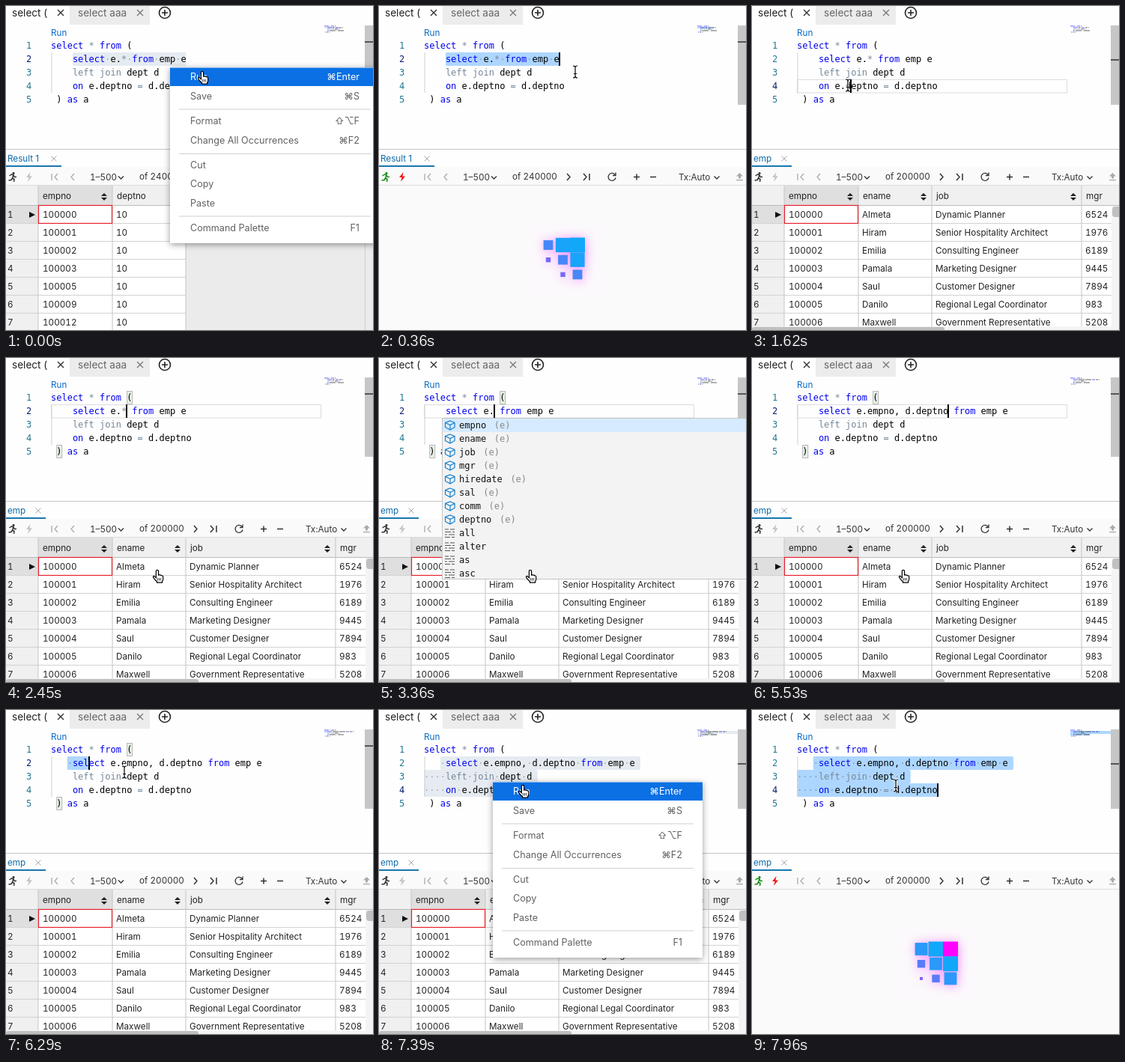
These frames come from a looping animation (490x433 px, 7.99 s). An HTML page:

```html
<!DOCTYPE html>
<html lang="en">
<head>
<meta charset="utf-8">
<title>SQL editor</title>
<style>
html, body { margin: 0; width: 100%; height: 100%; overflow: hidden; background: #fff; }
svg { display: block; width: 490px; height: 433px; }
text { font: 11.7px Inter, "DejaVu Sans", sans-serif; fill: #222; }
.code { font: 12px "DejaVu Sans Mono", monospace; }
.tab { font-size: 13.6px; }
.item { font-size: 12.6px; }
.num { font-variant-numeric: tabular-nums; }
.line { fill: none; stroke-width: 1.3; }
#menu { filter: drop-shadow(0 2px 4px #0006); }
</style>
</head>
<body>
<svg viewBox="0 0 490 433" xmlns="http://www.w3.org/2000/svg">
  <defs>
    <filter id="glow" x="-50%" y="-50%" width="200%" height="200%"><feGaussianBlur stdDeviation="7"/></filter>
  </defs>
  <rect width="490" height="433" fill="#fefefe"/>
  <g id="tabs"></g>
  <g id="editor"></g>
  <g id="result"></g>
  <g id="popup"></g>
  <g id="menu"></g>
  <g id="mouse"></g>
</svg>
<script>
const LOOP = 7990, CW = 7.224, LEFT = 60, TOP = 44, LH = 18;
const colX = c => LEFT + c * CW;
const lineY = l => TOP + l * LH;

const rect = (x, y, w, h, fill, more = '') =>
  `<rect x="${x}" y="${y}" width="${w}" height="${h}" fill="${fill}" ${more}/>`;
const text = (x, y, s, fill = '#222', cls = '', more = '') =>
  `<text x="${x}" y="${y}" style="fill:${fill}" class="${cls}" ${more}>${s}</text>`;
const line = (d, stroke, w = 1.3) =>
  `<path class="line" d="${d}" stroke="${stroke}" style="stroke-width:${w}"/>`;
const shape = (d, fill) => `<path d="${d}" fill="${fill}"/>`;
const cross = (x, y, r, c, w) =>
  line(`M${x - r} ${y - r}l${2 * r} ${2 * r}m0 ${-2 * r}l${-2 * r} ${2 * r}`, c, w);

// Last entry of [time, value] pairs that has begun
const at = (list, t) => list.reduce((v, e) => t >= e[0] ? e[1] : v, list[0][1]);

const cache = {};
function put(id, html) {
  if (cache[id] === html) return;
  cache[id] = html;
  document.getElementById(id).innerHTML = html;
}

/* ---------- timeline ---------- */
const FIELDS = [
  [0, 'e.*'], [2670, 'e.'], [2950, 'e'], [3190, 'e.'], [3830, 'e.empno'], [4160, 'e.empno,'],
  [4310, 'e.empno, '], [4370, 'e.empno, d'], [4430, 'e.empno, d.'], [4990, 'e.empno, d.deptno']
];
// Selection as [line, col, line, col]
const SELECTION = [
  [0, [1, 4, 1, 25]], [1590, null], [6230, [1, 3, 1, 4]], [6260, [1, 3, 1, 5]], [6290, [1, 3, 1, 7]],
  [6320, [1, 3, 1, 14]], [6350, [1, 3, 2, 13]], [6410, [1, 3, 2, 18]], [6440, [1, 3, 3, 19]],
  [6500, [1, 3, 3, 23]], [6560, [1, 3, 3, 26]]
];
const POPUP = [[0, ''], [3270, 'e'], [3830, ''], [4490, 'd'], [4990, '']];
const MENU = [[0, [219, 82]], [120, null], [7110, [152, 96]], [7690, null]];
const PATH = [
  [0, 262, 88], [1080, 262, 88], [1560, 128, 106], [1800, 128, 106], [2120, 163, 72], [2210, 163, 72],
  [2450, 202, 284], [5530, 202, 284], [6100, 84, 71], [6220, 84, 71], [6290, 158, 83], [6560, 250, 107],
  [6880, 250, 107], [7080, 153, 95], [7140, 153, 95], [7390, 192, 101], [LOOP, 192, 101]
];

function mouseAt(t) {
  const i = PATH.findIndex(p => p[0] > t), [t0, x0, y0] = PATH[i - 1], [t1, x1, y1] = PATH[i];
  let k = (t - t0) / (t1 - t0);
  k = k * k * (3 - 2 * k);
  return [+(x0 + (x1 - x0) * k).toFixed(1), +(y0 + (y1 - y0) * k).toFixed(1)];
}

/* ---------- tabs ---------- */
put('tabs',
  rect(85, 0, 107, 25, '#ececec') +
  text(8, 14, 'select (', '#222', 'tab') + cross(73, 9, 4, '#333', 1.4) +
  text(96, 14, 'select aaa', '#666', 'tab') + cross(179, 9, 4, '#777', 1.3) +
  `<circle class="line" cx="212" cy="9" r="7.5" stroke="#222" style="stroke-width:1.6"/>` +
  line('M208 9h8m-4-4v8', '#222', 1.6));

/* ---------- editor ---------- */
const KEYWORD = /^(select|from|on|as)$/, OPERATOR = /^(left|join|\*|=)$/;
const tokenColor = s => KEYWORD.test(s) ? '#0000f0' : OPERATOR.test(s) ? '#778899' : '#000';

function caretAt(t, sel, fields) {
  if (sel) return [sel[2], sel[3]];
  return t < 2150 ? [3, 10] : [1, 11 + fields.length];
}

function selectionSpans(sel, lines) {
  if (!sel) return [];
  const [l0, c0, l1, c1] = sel, spans = [];
  for (let l = l0; l <= l1; l++)
    spans.push([l, l === l0 ? c0 : 0, l === l1 ? c1 : lines[l].length + 1]);
  return spans;
}

function editor(t) {
  const fields = at(FIELDS, t), sel = at(SELECTION, t), focus = !at(MENU, t);
  const lines = ['select * from (', `    select ${fields} from emp e`, '    left join dept d',
    '    on e.deptno = d.deptno', ' ) as a'];
  const [cl, cc] = caretAt(t, sel, fields);
  const selColor = focus ? '#add6ff' : '#e5ebf1';
  let s = text(60, 40, 'Run', '#0a6ac8', '', 'font-size="12"');
  if (!sel) s += rect(60.5, lineY(cl) + .5, 360, 17.5, 'none', 'stroke="#dcdcdc"');

  const spans = selectionSpans(sel, lines);
  for (const [l, a, b] of spans) {
    s += rect(colX(a), lineY(l), (b - a) * CW, LH, selColor, 'rx="2"');
    s += rect(425, 28 + (l - 1) * 2, l === cl ? b - a : 54, 2, selColor);
    for (let c = a; c < Math.min(b, lines[l].length); c++)
      if (lines[l][c] === ' ') s += text(colX(c), lineY(l) + 13, '·', '#33333355', 'code');
  }
  s += rect(60.5, 62, 1, 54, '#d0d0d0');
  if (t >= 1680 && t < 6380)
    for (const [l, c] of [[0, 14], [4, 1]])
      s += rect(colX(c) + .5, lineY(l) + .5, 7, 17, '#e6f0e6', 'stroke="#b9b9b9"');

  lines.forEach((str, l) => {
    s += text(27, lineY(l) + 13, l + 1, l === cl ? '#0b216f' : '#237893', 'code');
    for (const m of str.matchAll(/[a-z]+|[^\sa-z]/g)) {
      const color = tokenColor(m[0]);
      s += text(colX(m.index), lineY(l) + 13, m[0], color, 'code');
      s += rect(425 + m.index, 26.3 + l * 2, m[0].length, 1.2, color, 'opacity=".5"');
    }
  });

  const blinkOff = t >= 3680 && t < 3830;
  if (focus && !blinkOff) s += rect(Math.round(colX(cc)) - 1, lineY(cl), 2, LH, '#000');
  s += rect(479, 26, 11, 106, '#c6c6c6') + rect(479, cl === 3 ? 71 : 47, 11, 2, '#555');
  put('editor', s);
}

/* ---------- result panel ---------- */
const SMALL = {
  total: 'of 240000', tab: 'Result 1', tabW: 74, edges: [43, 142, 240], heads: ['empno', 'deptno'],
  rows: [0, 1, 2, 3, 5, 9, 12].map(n => [100000 + n, 10])
};
const BIG = {
  total: 'of 200000', tab: 'emp', tabW: 53, edges: [43, 142, 240, 440, 540], heads: ['empno', 'ename', 'job', 'mgr'],
  rows: [
    ['Almeta', 'Dynamic Planner', 6524], ['Hiram', 'Senior Hospitality Architect', 1976],
    ['Emilia', 'Consulting Engineer', 6189], ['Pamala', 'Marketing Designer', 9445],
    ['Saul', 'Customer Designer', 7894], ['Danilo', 'Regional Legal Coordinator', 983],
    ['Maxwell', 'Government Representative', 5208]
  ].map((r, i) => [100000 + i, ...r])
};

function toolbar(d, busy) {
  const dark = '#333', pale = '#aaa', run = busy ? '#128a12' : dark;
  return rect(0, 191, 490, 1, '#c4c4c4') +
    text(2, 208, d.tab, '#0a6aa6', '', 'font-size="12"') + cross(d.tabW - 10, 204, 3.5, '#aaa', 1) +
    rect(0, 213, d.tabW, 2, '#1a76b0') +
    rect(0, 215, 490, 25, '#fafafa') +
    `<circle cx="10" cy="223.5" r="1.6" fill="${run}"/>` +
    line('M4.5 227l3-2 2.5 1-1.5 4 2.5 1.5-.5 3.5M8.5 230l-1.5 2.5-3.5 .5M10 226.5l1.5 2h2.5', run, 1.5) +
    shape('M32.5 222l-5.500 7h3.500l-1.500 6 6-7.500h-3.500z', busy ? '#f01818' : '#c4c4c4') +
    line('M61 224v9M69 224l-4 4.500 4 4.500M91 224l-4 4.500 4 4.500', pale) +
    text(112, 233, '1–500', dark, 'num') + line('M150 227.500l3.500 3.500 3.500-3.500', dark) +
    text(178, 232, d.total, dark, 'num') +
    line('M251 224l4 4.500-4 4.500M273 224l4 4.500-4 4.500M281 224v9', dark, 1.5) +
    line('M315.500 226a5 5 0 1 0 .5 3.500M316 222.500v4h-4', dark) +
    line('M340 228.500h8m-4-4v8M362 228.500h8', dark, 1.5) +
    text(400, 233, 'Tx:Auto', dark) + line('M447.500 227.500l3.500 3.500 3.500-3.500', dark) +
    shape('M481.500 223l4.500 4.500h-3v3h-3v-3h-3z', pale) + rect(477, 232, 9, 1.3, pale) +
    rect(0, 239.500, 490, 1, '#c4c4c4');
}

function grid(d) {
  const e = d.edges, end = Math.min(490, e[e.length - 1]);
  let s = rect(0, 240, 490, 193, '#ebebeb') + rect(0, 240, end, 27, '#f0f0f0') +
    rect(43, 240, 99, 27, '#dfdfdf') + rect(0, 267, 43, 166, '#f0f0f0') +
    rect(43, 267, end - 43, 166, '#fff') + rect(0, 267, 43, 24, '#dfdfdf');
  for (let y = 266; y < 433; y += 24) s += rect(0, y, end, 1, y === 266 ? '#bbb' : '#d2d2d2');
  for (const x of e) s += rect(x - .5, 240, 1, 193, '#c4c4c4');
  d.heads.forEach((h, i) => {
    s += text(e[i] + 6, 258, h);
    const x = e[i + 1] - 11;
    if (x < 490) s += shape(`M${x - 4} 254l4-4 4 4zM${x - 4} 256l4 4 4-4z`, '#222');
  });
  d.rows.forEach((r, i) => {
    const y = 283 + 24 * i;
    s += text(2, y, i + 1, '#222', 'num');
    r.forEach((v, j) => s += text(e[j] + (j ? 5 : 6), y, v, '#222', 'num'));
  });
  s += shape('M31 275l8 4-8 4z', '#111') + rect(43.500, 266.500, 98, 24, 'none', 'stroke="#e8202a" stroke-width="1.200"');
  if (d === BIG)
    s += rect(480, 267, 10, 166, '#f4f4f4') + rect(481, 268, 12, 14, '#c0c0c0', 'rx="4"') +
      rect(0, 428.500, 490, 5, '#f4f4f4') + rect(0, 429, 257, 6, '#c0c0c0', 'rx="3"');
  else s += rect(479, 267, 1, 166, '#d0d0d0');
  return s;
}

const mix = (a, b, k) => `rgb(${a.map((v, i) => Math.round(v + (b[i] - v) * k))})`;

// Squares grow in a wave that starts at the top right corner
function loader(ms) {
  const e = Math.min(1, Math.max(0, (ms - 30) / 240));
  let squares = '', halo = '';
  for (let row = 0; row < 3; row++) for (let col = 0; col < 3; col++) {
    const q = e * 1.6 - (2 - col + row) * .32 - .12;
    if (q <= 0) continue;
    const k = Math.min(1, q), w = 20 * k, x = 226 + col * 19.5 - w / 2, y = 319.5 + row * 19.7 - w / 2;
    const color = q > 1.3 ? '#ff00ff' : mix([165, 75, 245], [18, 168, 250], k);
    squares += rect(x.toFixed(1), y.toFixed(1), w.toFixed(1), w.toFixed(1), color);
    halo += rect((x + 1).toFixed(1), (y + 1).toFixed(1), w.toFixed(1), w.toFixed(1), '#f020ff');
  }
  return rect(0, 240, 490, 193, '#fafafa') + rect(195, 290, 104, 102, '#fbf9fb') +
    `<g filter="url(#glow)" opacity=".5">${halo}</g>${squares}`;
}

function result(t) {
  const d = t < 900 ? SMALL : BIG;
  const since = t >= 7690 ? t - 7690 : t >= 120 && t < 900 ? Math.min(t - 120, 240) : -1;
  put('result', toolbar(d, since >= 0) + (since >= 0 ? loader(since) : grid(d)));
}

/* ---------- suggestions ---------- */
const SUGGEST = {
  e: ['empno ename job mgr hiredate sal comm deptno', 'all alter as asc'],
  d: ['deptno dname loc', 'all alter as asc cast delete desc drop grant']
};

function popup(t) {
  const key = at(POPUP, t);
  if (!key) return put('popup', '');
  const [fields, words] = SUGGEST[key].map(s => s.split(' '));
  let s = rect(84.500, 80.500, 420, 215, '#f3f3f3', 'stroke="#c4c4c4"') + rect(85, 81, 420, 18, '#d6ebff');
  [...fields, ...words].forEach((w, i) => {
    const y = 90 + i * 18;
    s += text(107, y + 4, w, '#111', 'code');
    if (i < fields.length)
      s += line(`M95 ${y - 6}l6 2.500v6l-6 3.500-6.500-3.500v-6zM88.500 ${y - 3.500}l6.500 3 6-3M95 ${y - .5}v6.500`, '#1580cc', 1.2) +
        text(107 + w.length * CW + 10.6, y + 4, `(${key})`, '#888', 'code');
    else
      s += line(`M88 ${y - 5}h5m2 0h6M88 ${y - 1.500}h8m2 0h3M88 ${y + 2}h3m2 0h8M88 ${y + 5.500}h7m2 0h4`, '#555', 1.2);
  });
  put('popup', s);
}

/* ---------- context menu ---------- */
const ITEMS = [
  [0, 'Run', '⌘Enter'], [25.8, 'Save', '⌘S'], [58.8, 'Format', '⇧⌥F'], [84.6, 'Change All Occurrences', '⌘F2'],
  [117.6, 'Cut', ''], [143.4, 'Copy', ''], [169.2, 'Paste', ''], [202.2, 'Command Palette', 'F1']
];

function menu(pos, mouse) {
  if (!pos) return put('menu', '');
  const [x, y] = pos, over = mouse[1] > y + 1;
  let s = rect(x, y, 280, 235, '#fff');
  if (over) s += rect(x, y + .5, 280, 24.5, '#0a70e4');
  for (const dy of [55.500, 115, 198.500]) s += rect(x + 12, y + dy, 256, 1, '#d0d0d0');
  for (const [dy, name, keys] of ITEMS) {
    const color = over && !dy ? '#fff' : '#616161', by = y + dy + 17;
    s += text(x + 27, by, name, color, 'item') + text(x + 253, by, keys, color, 'item', 'text-anchor="end"');
  }
  put('menu', s);
}

/* ---------- pointer ---------- */
const HAND = '<path d="M-1.6 1a1.6 1.6 0 0 1 3.2 0V6q1.200-.9 2.200.3 1.300-.7 2.100.5 1.800-.2 1.800 1.600v3.200q0 1.800-1.200 3.200v1.400h-7v-1.400Q-3.500 12-5.300 9.300q-.8-1.800 1-2l2.700 2.400z" fill="#fff" stroke="#000" stroke-width="1.200"/>' +
  line('M.3 10v3.500M2.500 10v3.500M4.700 10v3.500', '#000', .8);
const BEAM_D = 'M-3-8q3 0 3 2 0-2 3-2M0-6V6M-3 8q3 0 3-2 0 2 3 2M-2 2.500h4';
const BEAM = line(BEAM_D, '#fff', 3) + line(BEAM_D, '#000', 1.2);

function frame() {
  const t = performance.now() % LOOP;
  const mouse = mouseAt(t), pos = at(MENU, t);
  const hand = mouse[1] > 192 || pos && mouse[0] > pos[0] && mouse[1] > pos[1];
  editor(t);
  result(t);
  popup(t);
  menu(pos, mouse);
  put('mouse', `<g transform="translate(${mouse})">${hand ? HAND : BEAM}</g>`);
  requestAnimationFrame(frame);
}
frame();
</script>
</body>
</html>
```
